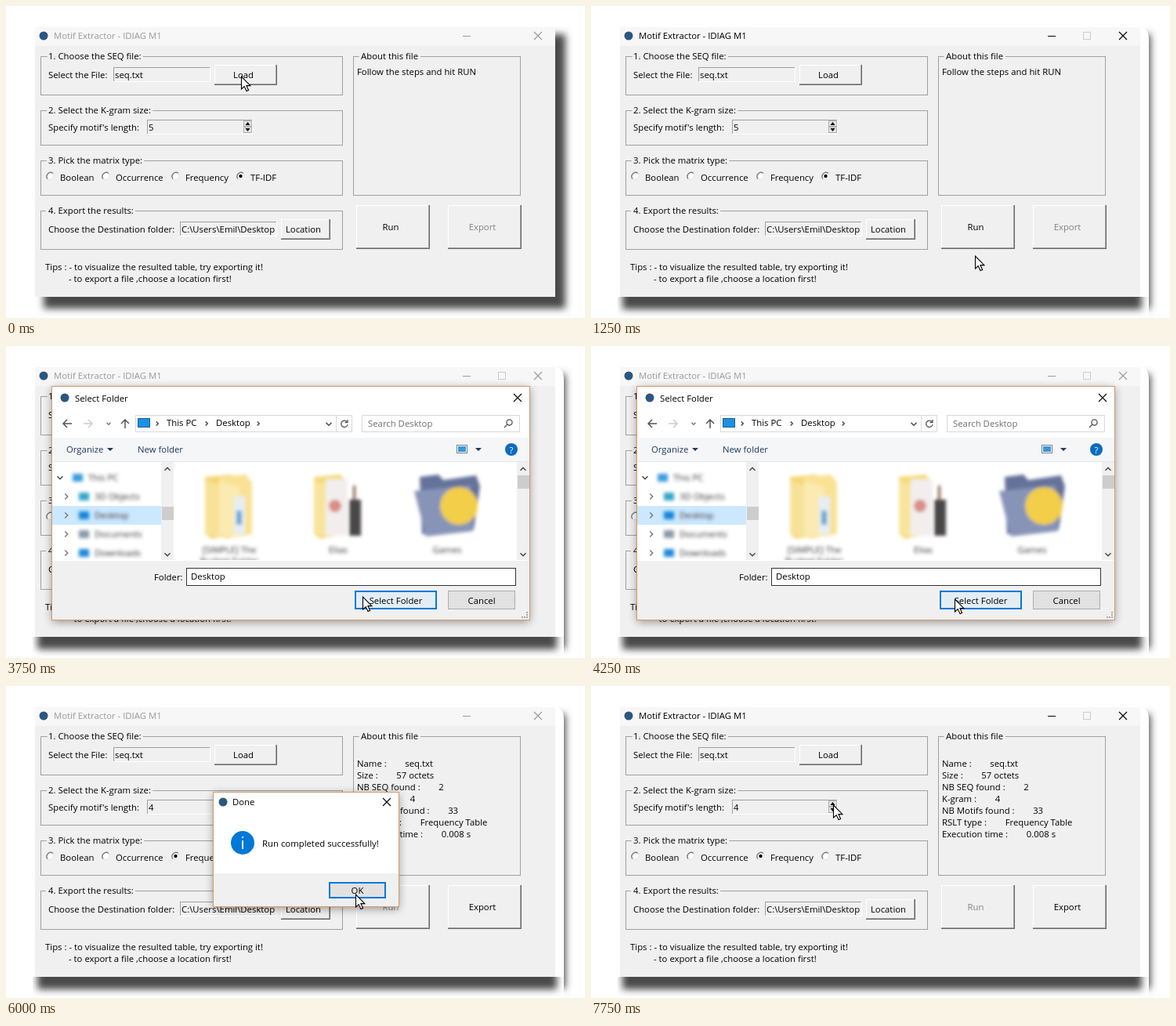
Recreate the animation shown at these times as an HTML page. Size 739x398 px, loop 8 s.

```html
<!DOCTYPE html>
<html lang="en">
<head>
<meta charset="utf-8">
<title>Motif Extractor</title>
<style>
html, body { margin: 0; width: 100%; height: 100%; overflow: hidden; background: #fff; }
svg { display: block; width: 739px; height: 398px; }
text { font: 11.35px "Open Sans", "Noto Sans", sans-serif; white-space: pre; }
.label { paint-order: stroke; stroke: #f0f0f0; stroke-width: 7px; stroke-linejoin: round; }
rect { shape-rendering: crispEdges; }
</style>
</head>
<body>
<svg viewBox="0 0 739 398" xml:space="preserve">
  <defs>
    <filter id="shadow" x="-10%" y="-10%" width="120%" height="120%"><feGaussianBlur stdDeviation="5"/></filter>
    <filter id="glow" x="-20%" y="-20%" width="140%" height="140%"><feGaussianBlur stdDeviation="6"/></filter>
    <filter id="blur" x="-20%" y="-20%" width="140%" height="140%"><feGaussianBlur stdDeviation="2.1"/></filter>
    <clipPath id="underWindow"><rect x="34" y="371" width="680" height="27"/></clipPath>
    <clipPath id="dialogBody"><rect x="59" y="148" width="609" height="125"/></clipPath>
    <clipPath id="pathEntry"><rect x="223" y="277" width="122" height="17"/></clipPath>
  </defs>
  <g id="scene"></g>
</svg>
<script>
const STEP = 250, LOOP = 8000;
const GRAY = '#f0f0f0', LINE = '#a0a0a0', BLUE = '#0078d7', MUTED = '#6d6d6d', NAVY = '#1e395b', ICON = '#2b567f';
const scene = document.getElementById('scene');

// [step, x, y]: the pointer stays put until the next entry
const pointer = [
  [0, 300, 90], [2, 268, 163], [3, 270, 210], [4, 500, 323], [5, 490, 319],
  [6, 309, 154], [8, 168, 205], [9, 215, 217], [11, 291, 251], [12, 385, 285],
  [14, 420, 305], [15, 455, 320], [17, 464, 323], [20, 487, 283], [23, 455, 274],
  [24, 446, 266], [25, 447, 271], [26, 446, 266], [29, 420, 240], [30, 350, 185], [31, 309, 152]
];

// Basic shapes
const box = (x, y, w, h, fill, stroke, weight = 1) => stroke
  ? `<rect x="${x + weight / 2}" y="${y + weight / 2}" width="${w - weight}" height="${h - weight}" fill="${fill}" stroke="${stroke}" stroke-width="${weight}"/>`
  : `<rect x="${x}" y="${y}" width="${w}" height="${h}" fill="${fill}"/>`;
const text = (x, y, s, fill = '#000', attrs = '') => `<text x="${x}" y="${y}" fill="${fill}" ${attrs}>${s}</text>`;
const centered = (x, y, s, fill) => text(x, y, s, fill, 'text-anchor="middle"');
const path = (d, stroke = '#444', width = 1, fill = 'none') =>
  `<path d="${d}" fill="${fill}" stroke="${stroke}" stroke-width="${width}"/>`;
const dot = (x, y, r, fill) => `<circle cx="${x}" cy="${y}" r="${r}" fill="${fill}"/>`;
const group = (attrs, ...parts) => `<g ${attrs}>${parts.join('')}</g>`;
const cross = (x, y, color) => path(`M${x - 5} ${y - 5}l10 10m0-10l-10 10`, color, 1.1);
const chevron = (x, y, angle = 0, color = '#444', size = 3.5) =>
  `<path transform="translate(${x} ${y}) rotate(${angle})" d="M${-size} ${-size / 2}L0 ${size / 2}L${size} ${-size / 2}" fill="none" stroke="${color}" stroke-width="1.4"/>`;
const caret = (x, y, color = NAVY) => path(`M${x - 4} ${y - 2}h8l-4 4z`, 'none', 0, color);

// Main window widgets
const frame = (x, y, w, h, label) =>
  box(x, y, w, h, 'none', LINE) + text(x + 10, y + 4, label, '#000', 'class="label"');
const sunken = (x, y, w, h) =>
  box(x, y, w, h, '#fff') + box(x, y, w - 1, h - 1, LINE) + box(x + 1, y + 1, w - 2, h - 2, GRAY);
const raised = (x, y, w, h, label, enabled = true) =>
  box(x, y, w, h, '#696969') + box(x, y, w - 1, h - 1, LINE) + box(x, y, w - 2, h - 2, '#fff') +
  box(x + 1, y + 1, w - 3, h - 3, GRAY) +
  centered(x + w / 2 - 3, y + h / 2 + 4, label, enabled ? '#000' : '#838383');
const radio = (x, label, on) =>
  dot(x, 217, 5, '#fff') + path(`M${x - 3.5} 220.5a5 5 0 0 1 7-7`, '#777', 1.4) +
  path(`M${x + 3.5} 213.5a5 5 0 0 1-7 7`, '#ddd') +
  (on ? dot(x, 217, 2.2, '#000') : '') + text(x + 12.5, 223, label);
const spinButton = (y, up) => box(303, y, 11, 8, '#e4e4e4', '#b0b0b0') +
  path(up ? `M305.5 ${y + 6}h6l-3-4z` : `M305.5 ${y + 2}h6l-3 4z`, 'none', 0, '#000');

function windowShadow(first) {
  const cast = group('filter="url(#shadow)"', box(48, 36, 666, 350, '#484848'));
  if (first) return cast;
  return cast + '<path d="M28 26H702Q712 29 712 42V398H28z" fill="#fff"/>' +
    group('clip-path="url(#underWindow)"',
      group('filter="url(#shadow)"', box(40, 300, 663, 87, '#484848')));
}

function mainWindow(s) {
  const ink = s.active ? '#000' : '#999';
  const report = ['Name :        seq.txt', 'Size :        57 octets', 'NB SEQ found :        2',
    'K-gram :        4', 'NB Motifs found :        33', 'RSLT type :        Frequency Table',
    'Execution time :        0.008 s'];
  const radios = [[56.5, 'Boolean'], [127.5, 'Occurrence'], [216.5, 'Frequency'], [299.5, 'TF-IDF']];
  return [
    box(37, 27, 664, 344, GRAY), box(37, 27, 664, 24, '#f7f7f7'),
    dot(48, 38, 5.5, ICON), text(61, 42, 'Motif Extractor - IDIAG M1', ink),
    box(583, 38, 10, 1, ink), s.maximize ? box(628, 33, 10, 10, 'none', '#ccc') : '', cross(679, 38, ink),

    frame(44, 64, 386, 50, '1. Choose the SEQ file:'),
    text(54, 92, 'Select the File:'), sunken(137, 78, 124, 19), text(139, 92, 'seq.txt'),
    raised(266, 75, 80, 26, 'Load'),

    frame(44, 133, 386, 45, '2. Select the K-gram size:'),
    text(54, 159, "Specify motif's length:"), sunken(180, 145, 135, 19), text(182, 159, s.length),
    spinButton(146, true), spinButton(154, false),

    frame(44, 197, 386, 45, '3. Pick the matrix type:'),
    ...radios.map(([x, label]) => radio(x, label, label === s.matrix)),

    frame(44, 261, 386, 50, '4. Export the results:'),
    text(54, 289, 'Choose the Destination folder:'), sunken(222, 275, 124, 19),
    group('clip-path="url(#pathEntry)"', text(224, 289, 'C:\\Users\\Emil\\Desktop')),
    raised(351, 272, 63, 26, 'Location'),

    text(50, 337, 'Tips : - to visualize the resulted table, try exporting it!'),
    text(80, 352, '- to export a file ,choose a location first!'),

    frame(443, 64, 214, 178, 'About this file'),
    ...(s.done ? report.map((line, i) => text(448, 103 + 15 * i, line))
               : [text(448, 88, 'Follow the steps and hit RUN')]),
    raised(447, 254, 94, 56, 'Run', !s.done), raised(564, 254, 94, 56, 'Export', s.done)
  ].join('');
}

// Dialog pieces
const flatButton = (x, y, w, h, label, weight = 0, fill = '#e1e1e1') =>
  box(x, y, w, h, fill, weight ? BLUE : '#adadad', weight || 1) + centered(x + w / 2, y + h / 2 + 4.5, label);
const dialogGlow = (x, y, w, h) =>
  group('filter="url(#glow)" opacity=".4"', box(x + 1, y + 3, w - 2, h - 1, '#000'));
const dialogEdge = (x, y, w, h) => box(x, y, w, h, 'none', '#d39a6c');
const scrollColumn = (x, thumbY) =>
  box(x, 148, 16, 125, GRAY) + box(x + 1, thumbY, 15, 17, '#cdcdcd') +
  chevron(x + 8, 157, 180) + chevron(x + 8, 266);

function dialogShell(title, search, canGoBack) {
  const back = canGoBack ? '#555' : '#ccc';
  return [
    dialogGlow(58, 51, 611, 299),
    box(59, 51, 610, 299, '#fff'), box(59, 274, 610, 76, GRAY), dialogEdge(58, 51, 611, 299),
    dot(75, 66, 5.5, ICON), text(88, 71, title), cross(653, 66, '#000'),
    path('M84 99h-11m5-5l-5 5 5 5', back, 1.5), path('M99 99h11m-5-5l5 5-5 5', '#ccc', 1.5),
    chevron(131, 99, 0, canGoBack ? '#777' : '#ccc', 2.5), path('M152 105v-11m-5 5l5-5 5 5', '#555', 1.5),
    box(165, 88, 277, 22, '#fff', '#d9d9d9'), box(421, 89, 1, 20, '#d9d9d9'), chevron(412, 99.5),
    path('M435 96.5a4.2 4.2 0 1 0 1 3.5m0-6v3.5h-3.5', '#555', 1.3),
    box(454, 88, 202, 22, '#fff', '#d9d9d9'), text(462, 103, search, MUTED),
    path('M640 100l-4 4m4-4a3.6 3.6 0 1 1 5 0a3.6 3.6 0 0 1-5 0', '#555', 1.3),
    box(60, 117, 608, 30, '#f5f6f7'), box(60, 147, 608, 1, '#e4e6e8'),
    text(77, 136, 'Organize', NAVY), caret(133, 132), text(168, 136, 'New folder', NAVY),
    dot(645, 132, 8, '#0a6cc0'), centered(645, 136.5, '?', '#fff'),
    flatButton(564, 312, 86, 24, 'Cancel'),
    ...[0, 1, 2].map(i => box(664 - 3 * i, 345, 1.5, 1.5, '#aaa') + (i < 2 ? box(664, 342 - 3 * i, 1.5, 1.5, '#aaa') : ''))
  ].join('');
}

function fileDialog(chosen) {
  const drives = ['Local Disk (C:)', 'Data (E:)', 'Media (M:)', 'Others (O:)', 'Work (W:)'];
  const fileRow = (y, name, date) =>
    path(`M239.5 ${y - 11.5}h8l3 3v12h-11z`, '#999', 1, '#fff') +
    [0, 1, 2, 3].map(i => box(241, y - 8 + 2 * i, 7, 1, '#aaa')).join('') +
    text(257, y, name) + text(497, y, date, MUTED) + text(617, y, 'Text Document', MUTED);
  return [
    dialogShell('Choose a file.', 'Search seq', false),
    path('M170 91h6l1 2h6v13h-13z', '#e8c25d', 0.6, '#fbdc83'),
    chevron(191.5, 99, 90, '#444', 2.6), chevron(195.5, 99, 90, '#444', 2.6),
    text(205, 102, 'Motif extractor'), chevron(294, 99, -90, '#444', 2.6), text(306, 102, 'seq'),
    ...[0, 1, 2].map(i => box(547, 127 + 4 * i, 3, 3, '#8aa0b4') + box(552, 128 + 4 * i, 4, 1, '#777') + box(558, 128 + 4 * i, 4, 1, '#777')),
    caret(575, 132), box(601, 126, 16, 12, '#fff', '#4b86b4'), box(610, 127, 6, 10, '#5aa5dc'),
    group('clip-path="url(#dialogBody)"',
      group('filter="url(#blur)"',
        box(59, 244, 139, 24, '#d6d6d6'),
        ...drives.map((name, i) => box(92, 161 + 24 * i, 13, 5, '#555') + text(112, 164 + 24 * i, name, '#333')),
        box(93, 154, 6, 6, '#4aa3e0')),
      scrollColumn(198, 232),
      box(219, 148, 272, 24, '#d9ebf9'), box(473, 148, 1, 24, '#fff'), box(490, 148, 1, 24, '#e5e5e5'), box(610, 148, 1, 24, '#e5e5e5'),
      text(236, 165, 'Name', '#4c607a'), chevron(360, 151, 180, '#777'), chevron(482, 160, 0, '#777', 3),
      text(497, 165, 'Date modified', '#4c607a'), text(617, 165, 'Type', '#4c607a'),
      chosen ? box(219, 201, 449, 21, '#cce8ff') : '',
      fileRow(194, 'F1_2.txt', '29-Mar-18 1:48 PM'), fileRow(215, 'seq.txt', '24-May-18 5:38 PM'),
      box(219, 257, 449, 16, GRAY), box(236, 257, 310, 15, '#cdcdcd'), chevron(227, 265, 90), chevron(660, 265, -90)),
    text(189, 298, 'File name:'), box(248, 283, 203, 23, '#fff', BLUE), chevron(441, 294),
    chosen ? text(253, 298, 'seq.txt') : '',
    box(463, 282, 188, 23, '#e1e1e1', '#adadad'), text(467, 298, 'Text File (*.txt)'), chevron(641, 294),
    flatButton(464, 312, 86, 24, 'Open', 2)
  ].join('');
}

function folderDialog(hover) {
  const places = [['This PC', '#3d9be0'], ['3D Objects', '#35a6c9'], ['Desktop', '#1686d9'], ['Documents', '#8b9aa8'], ['Downloads', '#2489dc']];
  const folder = (x, fill) => path(`M${x} 167l34-3 8 10v66l-34 6-8-6z`, 'none', 0, fill) +
    path(`M${x} 172l26 8v66l-26-6z`, 'none', 0, '#fff4');
  return [
    dialogShell('Select Folder', 'Search Desktop', true),
    box(168, 92, 16, 12, '#1d91e4', '#17608f'),
    ...[193, 256, 322].map(x => chevron(x, 99, -90, '#444', 2.6)), text(205, 102, 'This PC'), text(268, 102, 'Desktop'),
    box(575, 126, 14, 11, '#fff', '#6b8299'), box(577, 128, 10, 7, '#3f95d3'), caret(603, 132),
    group('clip-path="url(#dialogBody)"',
      box(59, 204, 139, 24, '#cce8ff'), chevron(69, 168),
      ...[192, 216, 240, 264].map(y => chevron(77, y, -90, '#777')),
      group('filter="url(#blur)"',
        ...places.map(([name, color], i) => {
          const indent = i ? 8 : 0, y = 168 + 24 * i;
          return box(85 + indent, y - 5, 13, 10, color) + text(105 + indent, y + 4, name, '#333');
        }),
        folder(254, '#f5d774'), folder(272, '#f9e294'), box(291, 192, 14, 48, '#e5eef3'), box(294, 210, 7, 18, '#6aa5d2'),
        folder(393, '#f6da78'), box(408, 170, 28, 72, '#f2eeee'), dot(420, 204, 8, '#d98e86'),
        box(438, 196, 15, 46, '#4a4646'), box(443, 178, 3, 18, '#7c5743'),
        path('M528 167l24-3 6 7 42-6 5 14-8 55-66 6z', 'none', 0, '#65729a'),
        path('M521 185l72-7 3 58-60 7z', 'none', 0, '#8794b8'), dot(578, 204, 24, '#f2ce48'),
        centered(285, 264, '[SIMPLE] The', '#333'), centered(285, 278, 'Budget Folder', '#333'),
        centered(424, 264, 'Elias', '#333'), centered(563, 264, 'Games', '#333')),
      scrollColumn(198, 205), scrollColumn(652, 165)),
    text(189, 299, 'Folder:'), box(230, 283, 421, 23, '#fff', '#333'), text(236, 298, 'Desktop'),
    flatButton(445, 312, 105, 24, 'Select Folder', 2, hover ? '#e3edf5' : '#e1e1e1')
  ].join('');
}

const doneDialog = pressed => [
  dialogGlow(264, 135, 238, 147),
  box(264, 135, 238, 147, '#fff'), box(264, 239, 238, 43, GRAY), dialogEdge(264, 135, 238, 147),
  dot(277, 148, 5.5, ICON), text(289, 152, 'Done'), cross(486, 148, '#000'),
  dot(302, 200, 15, BLUE), box(301, 197, 2, 11, '#fff'), box(301, 192, 2, 2, '#fff'),
  text(327, 205, 'Run completed successfully!'),
  flatButton(412, 250, 73, 21, 'OK', pressed ? 1 : 2, pressed ? '#cce4f7' : '#e1e1e1')
].join('');

const arrow = (x, y) => path(`M${x} ${y}v16l3.7-3.4 2.8 6 2.6-1.2-2.7-5.8h5z`, '#000', 1.1, '#fff');

function draw(step) {
  const within = (from, to) => step >= from && step < to;
  const file = within(1, 5), folder = within(13, 18), done = within(22, 28);
  const [, x, y] = pointer.filter(p => p[0] <= step).pop();
  scene.innerHTML = windowShadow(step === 0) +
    mainWindow({
      active: step > 0 && !file && !folder && !done,
      maximize: step > 0 && !done,
      length: step < 7 ? '5' : '4',
      matrix: step < 9 ? 'TF-IDF' : 'Frequency',
      done: step >= 22
    }) +
    (file ? fileDialog(step >= 3) : '') +
    (folder ? folderDialog(step >= 15) : '') +
    (done ? doneDialog(step === 25) : '') +
    arrow(x + 0.5, y);
}

let shown = -1;
function tick() {
  const step = Math.floor(performance.now() % LOOP / STEP);
  if (step !== shown) draw(shown = step);
  requestAnimationFrame(tick);
}
tick();
</script>
</body>
</html>
```
